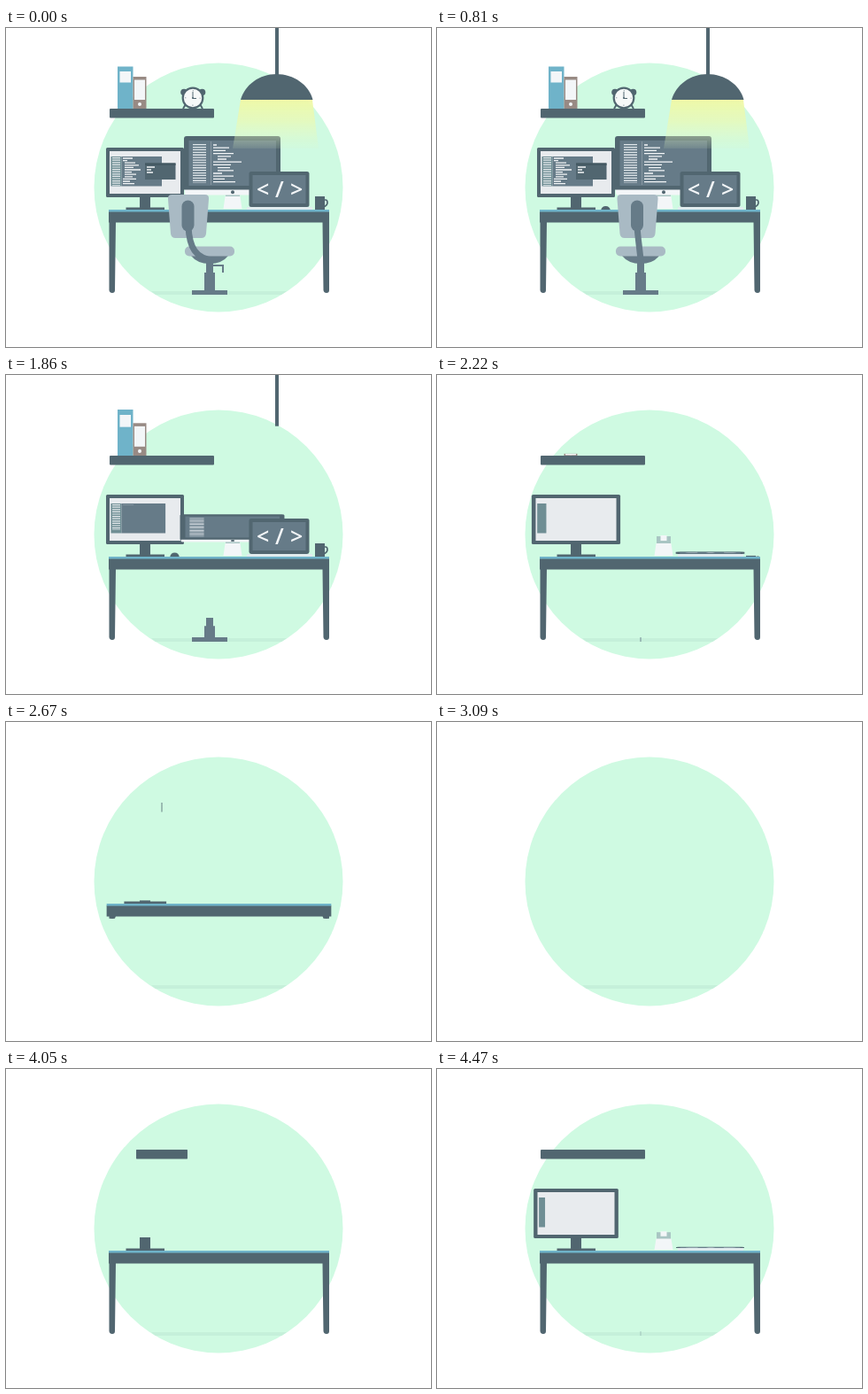
An HTML page without scripts for the animation above (4.5 s loop, 480x360 px).

```html
<!DOCTYPE html>
<html lang="en">
<head>
<meta charset="utf-8">
<title>Developer desk</title>
<style>
:root {
  --dark: #516670; --slate: #667b88; --blue: #6fb3c9; --pale: #a9bac4; --white: #f3f6f8;
  --in: cubic-bezier(.6, -.28, .735, .045);
  --out: cubic-bezier(.175, .885, .32, 1.28);
}
html, body { margin: 0; width: 100%; height: 100%; overflow: hidden; background: #fff; }
svg { display: block; width: 100%; height: 100%; }
.dark { fill: var(--dark); } .slate { fill: var(--slate); } .blue { fill: var(--blue); }
.pale { fill: var(--pale); } .white { fill: var(--white); }
.line { fill: none; stroke: var(--white); stroke-width: 1.3; }

/* Each moving part names its keyframes in --k and its anchor in --o. */
.a {
  transform-box: fill-box; transform-origin: var(--o, center);
  animation: var(--k) 4.5s var(--in) infinite;
}
.up { --o: bottom; } .down { --o: top; } .left { --o: left; }

/* Lamp */
@keyframes beam { 0%, 21% { opacity: 1; animation-timing-function: linear } 28%, to { opacity: 0 } }
@keyframes shade { 0%, 28% { scale: 1 1 } 34.45%, to { scale: 0 1 } }
@keyframes cord { 0%, 35% { scale: 1 1 } 48%, to { scale: 1 0 } }

/* Shelf */
@keyframes shelf {
  0%, 52% { scale: 1 1 } 59.37%, 88% { scale: 0 1; animation-timing-function: var(--out) } 95%, to { scale: 1 1 }
}
@keyframes tall { 0%, 38% { scale: 1 1 } 48.5%, to { scale: 1 0 } }
@keyframes short { 0%, 41% { scale: 1 1 } 49.5%, to { scale: 1 0 } }
@keyframes trim { 0%, 22% { scale: 1 } 28%, to { scale: 0 } }
@keyframes hop {
  0%, 29% { translate: 0 0; scale: 1; animation-timing-function: ease-out }
  34% { translate: 0 -24px; scale: 1 }
  40%, to { translate: 0 -24px; scale: 0 }
}

/* Desk */
@keyframes top {
  0%, 59% { scale: 1 1 } 67.5%, 72.5% { scale: 0 1; animation-timing-function: var(--out) } 83%, to { scale: 1 1 }
}
@keyframes legs {
  0%, 52% { scale: 1 1 } 59.43%, 83% { scale: 1 0; animation-timing-function: var(--out) } 90%, to { scale: 1 1 }
}
@keyframes mouse { 0%, 40% { scale: 1 1 } 45%, to { scale: 1 0 } }
@keyframes mug { 0%, 43% { scale: 1 1 } 49.6%, to { scale: 1 0 } }

/* Left monitor */
@keyframes foot {
  0%, 57.1% { scale: 1 1 } 63.1%, 79.3% { scale: 0 1; animation-timing-function: var(--out) } 84.3%, to { scale: 1 1 }
}
@keyframes neck {
  0%, 54% { scale: 1 1 } 59.55%, 84% { scale: 1 0; animation-timing-function: var(--out) } 88%, to { scale: 1 1 }
}
@keyframes screen {
  0%, 45.9% { scale: 1 1; animation-timing-function: cubic-bezier(.6, -.38, .735, .045) }
  55.2%, 91% { scale: 0 1; animation-timing-function: ease-out }
  96% { scale: 1.136 1; animation-timing-function: ease-in-out }
  to { scale: 1.085 1 }
}
@keyframes gutter {
  0%, 44% { scale: 1 1 } 49.33% { scale: .75 1 } 52%, 96% { scale: 0 1; animation-timing-function: ease-out }
  99.3%, to { scale: .53 1 }
}
@keyframes marks { 0%, 36% { clip-path: inset(0) } 44%, to { clip-path: inset(0 0 100%) } }
@keyframes editor { 0%, 38% { scale: 1 1 } 46%, to { scale: 0 1 } }
@keyframes erase { 0%, 20% { clip-path: inset(-1px); animation-timing-function: linear } 40%, to { clip-path: inset(-1px -1px 100%) } }
@keyframes popup { 0%, 24% { scale: 1 1 } 31%, to { scale: 0 1 } }

/* Middle monitor */
@keyframes display {
  0%, 32% { scale: 1 1; animation-timing-function: linear }
  34% { scale: 1.01 .967; animation-timing-function: ease-in }
  45%, to { scale: 1.15 0 }
}
@keyframes eraseFast { 0%, 20% { clip-path: inset(-1px); animation-timing-function: linear } 32%, to { clip-path: inset(-1px -1px 100%) } }
@keyframes pane {
  0%, 28% { scale: 1 1; opacity: 0; animation-timing-function: linear }
  30% { scale: 1 1; opacity: 1; animation-timing-function: ease-in }
  34% { scale: .37 1; opacity: 1 }
  36%, to { scale: 0 1; opacity: 1 }
}
@keyframes stand {
  0%, 50% { scale: 1 1 } 57%, 93% { scale: 1 0; animation-timing-function: ease-out } 98.5%, to { scale: 1 .9 }
}

/* Laptop */
@keyframes lid {
  0%, 41% { scale: 1 1; animation-timing-function: ease-in }
  49.33% { scale: 1.14 .06 }
  54%, 96% { scale: 0 .03; animation-timing-function: ease-out }
  99.2%, to { scale: 1.13 .03 }
}
@keyframes keys {
  0%, 49.5% { scale: 1 1 } 55%, 95% { scale: 0 1; animation-timing-function: ease-out } 99%, to { scale: 1 1 }
}

/* Chair */
@keyframes swing { 0% { translate: -20.5px; animation-timing-function: ease-in-out } 18%, to { translate: 0 } }
@keyframes back { 0%, 22% { scale: 1 1 } 29%, to { scale: 1 0 } }
@keyframes spine {
  0% { d: path("M206 224C207 247 214 261 235 262"); scale: 1 1; animation-timing-function: ease-in-out }
  18%, 26% { d: path("M226 224C227 238 229 250 230 262"); scale: 1 1 }
  32%, to { d: path("M226 224C227 238 229 250 230 262"); scale: 1 0 }
}
@keyframes lever { 0% { scale: 1 1; animation-timing-function: ease-in-out } 16%, to { scale: 0 1 } }
@keyframes bowl { 0%, 27% { scale: 1 1 } 33%, to { scale: 0 1 } }
@keyframes seat { 0%, 28% { scale: 1 1 } 34.4%, to { scale: 0 1 } }
@keyframes pole { 0%, 35% { scale: 1 1 } 43%, to { scale: 1 0 } }
@keyframes wheels {
  0%, 42% { scale: 1 1 } 49.4%, 99.2% { scale: 0 1; animation-timing-function: linear } to { scale: .05 1 }
}
</style>
</head>
<body>
<svg viewBox="0 0 480 360">
  <defs>
    <linearGradient id="glow" x1="0" y1="0" x2="0" y2="1">
      <stop offset="0" stop-color="#f0f8a4" stop-opacity=".95"/>
      <stop offset=".45" stop-color="#eaf9b4" stop-opacity=".75"/>
      <stop offset="1" stop-color="#e2fac6" stop-opacity=".1"/>
    </linearGradient>
  </defs>

  <circle cx="240" cy="180" r="140.5" fill="#cffae2"/>
  <path d="M164 297H317L311 301H169Z" fill="#c5f0da"/>

  <!-- Shelf -->
  <g class="a up" style="--k:tall">
    <path class="blue" d="M126 43.5H143.500V91H126Z"/>
    <path class="white" d="M128.500 49H141V61.500H128.500Z"/>
  </g>
  <g class="a up" style="--k:short">
    <path d="M143.500 55H158.500V91H143.500Z" fill="#988a84"/>
    <path class="white" d="M145 58.500H157V81H145Z"/>
    <circle class="white" cx="151" cy="86" r="2"/>
  </g>
  <g class="a" style="--k:hop">
    <g class="a dark" style="--k:trim">
      <circle cx="201" cy="72.500" r="3.800"/><circle cx="221.500" cy="72.500" r="3.800"/>
      <path d="M203 86L200 91M219 86L222 91" stroke="#516670" stroke-width="2"/>
    </g>
    <circle cx="211" cy="79" r="11.300" fill="#f6f8f8" stroke="#516670" stroke-width="2.200"/>
    <circle cx="211" cy="79" r="8.300" fill="none" stroke="#8b9aa1" stroke-width="1.500" stroke-dasharray="1 12.038" stroke-dashoffset=".5"/>
    <path class="a" style="--k:trim" d="M211 72V79.500H215" fill="none" stroke="#516670"/>
    <circle class="dark" cx="211" cy="79" r="1"/>
  </g>
  <rect class="dark a" style="--k:shelf" x="117" y="91" width="118" height="10.500" rx="1"/>

  <!-- Left monitor -->
  <rect class="dark a" style="--k:foot" x="135.500" y="202.500" width="43.500" height="3.500"/>
  <rect class="dark a up" style="--k:neck" x="151" y="190" width="12" height="13"/>
  <g class="a" style="--k:screen">
    <rect class="dark" x="113" y="135" width="88" height="56" rx="1.500"/>
    <path d="M117 139H197V187H117Z" fill="#e8ebee"/>
    <g class="a left" style="--k:gutter">
      <path d="M118.500 145H130.500V178.500H118.500Z" fill="#6f8e94"/>
      <path class="a" style="--k:marks" d="M119.500 146.500h10v31h-10z" fill="none"/>
      <g class="a" style="--k:marks"><path d="M124.500 146V178" fill="none" stroke="#e4e9ec" stroke-width="9" stroke-dasharray="1.200 1.400"/></g>
    </g>
    <g class="a left" style="--k:editor">
      <path class="slate" d="M130.500 145H176V178.500H130.500Z"/>
      <path class="line a" style="--k:erase" d="M132 147h11m-11 2.600h5m-3 2.600h12m-12 2.600h16m-16 2.600h10m-10 2.600h18m-18 2.600h8m-8 2.600h13m-13 2.600h9m-11 2.600h15m-15 2.600h8m-8 2.600h13"/>
    </g>
    <g class="a" style="--k:popup">
      <path class="dark" d="M157 152.500H191.500V171H157Z"/>
      <path d="M157 152.500H191.500V155H157Z" fill="#445963"/>
      <path class="line" d="M159 157h9m-9 3h5m-5 3h7"/>
    </g>
  </g>

  <!-- Middle monitor -->
  <g class="a up" style="--k:stand">
    <path d="M248 182H264V191H248Z" fill="#a9c5c3"/>
    <path class="white" d="M252.500 181H259.500V187H252.500ZM247.500 190H264.500L266.500 204H245.500Z"/>
  </g>
  <g class="a up" style="--k:display">
    <path class="white" d="M202 181H310V186Q310 188.500 307 188.500H205Q202 188.500 202 186Z"/>
    <path class="dark" d="M201 182.500V125Q201 122 204 122H307Q310 122 310 125V182.500Z"/>
    <path class="slate" d="M206.500 127H305V178H206.500Z"/>
    <path class="a left pane" style="--k:pane" d="M228 127H305V178H228Z" fill="#7c909c"/>
    <path d="M218.500 131V175" fill="none" stroke="#dfe6ea" stroke-width="15" stroke-dasharray="1.300 1.600"/>
    <g class="a" style="--k:eraseFast">
      <path d="M231.500 128V177" stroke="#8798a2"/>
      <path class="line" d="M234 132h4m-4 3.200h18m-18 3.200h14m-14 3.200h23m-18 3.200h15m-15 3.200h10m-15 3.200h32m-32 3.200h20m-15 3.200h14m-14 3.200h18m-23 3.200h10m-10 3.200h23m-23 3.200h13m-13 3.200h25"/>
    </g>
    <circle class="dark" cx="256" cy="185.300" r="2"/>
  </g>

  <!-- Laptop, mouse, mug -->
  <rect class="a" style="--k:keys" x="272" y="202" width="74" height="3" fill="#e1ecee"/>
  <g class="a up" style="--k:lid">
    <rect class="dark" x="274.500" y="162" width="68" height="40" rx="2.500"/>
    <path class="slate" d="M278.500 166H338.500V198H278.500Z"/>
    <text class="white" x="283 304 321" y="191" font-family="'Open Sans', sans-serif" font-size="25" font-weight="600">&lt;/&gt;</text>
  </g>
  <path class="dark a up" style="--k:mouse" d="M185 206Q186 201 190.500 201T196 206Z"/>
  <g class="a up" style="--k:mug">
    <path class="dark" d="M349 190H360V206H349Z"/>
    <path d="M359 194H361Q363 194 363 197T359 202" fill="none" stroke="#516670" stroke-width="1.700"/>
  </g>

  <!-- Lamp -->
  <path class="a" style="--k:beam" d="M265 81H346L353 136H256Z" fill="url(#glow)"/>
  <rect class="dark a down" style="--k:cord" x="304" y="0" width="4" height="54"/>
  <path class="dark a" style="--k:shade" d="M265 81C270 64 286 52 305.500 52S342 64 346.500 81Z"/>

  <!-- Desk -->
  <g class="dark a down" style="--k:legs">
    <path d="M116.500 219H124L123 296Q123 299 120 299T116.500 296ZM357.500 219H365V296Q365 299 362 299T358.500 296Z"/>
  </g>
  <g class="a" style="--k:top">
    <path class="dark" d="M116 207H365V219.500H116Z"/>
    <path class="blue" d="M116 205H365V207.500H116Z"/>
  </g>

  <!-- Chair -->
  <rect class="slate a" style="--k:wheels" x="210" y="296" width="40" height="5"/>
  <path class="slate a up" style="--k:pole" d="M226 262H234V276H236V297H224V276H226Z"/>
  <path class="a left" style="--k:lever" d="M234 268H245V276" fill="none" stroke="#667b88" stroke-width="2"/>
  <path class="slate a" style="--k:bowl" d="M209 257H251Q244 266 230 266T209 257Z"/>
  <rect class="pale a" style="--k:seat" x="202" y="246.500" width="56" height="11" rx="5"/>
  <g class="a" style="--k:swing">
    <g class="a up" style="--k:back">
      <path class="pale" d="M208 188H245Q250 188 249.500 193L246.500 232Q246 237 241 237H212Q207 237 206.500 232L203.500 193Q203 188 208 188Z"/>
      <rect class="slate" x="219" y="194.500" width="14" height="35" rx="7"/>
    </g>
  </g>
  <path class="a up" style="--k:spine" d="M226 224C227 238 229 250 230 262" fill="none" stroke="#667b88" stroke-width="7"/>
</svg>
</body>
</html>
```
